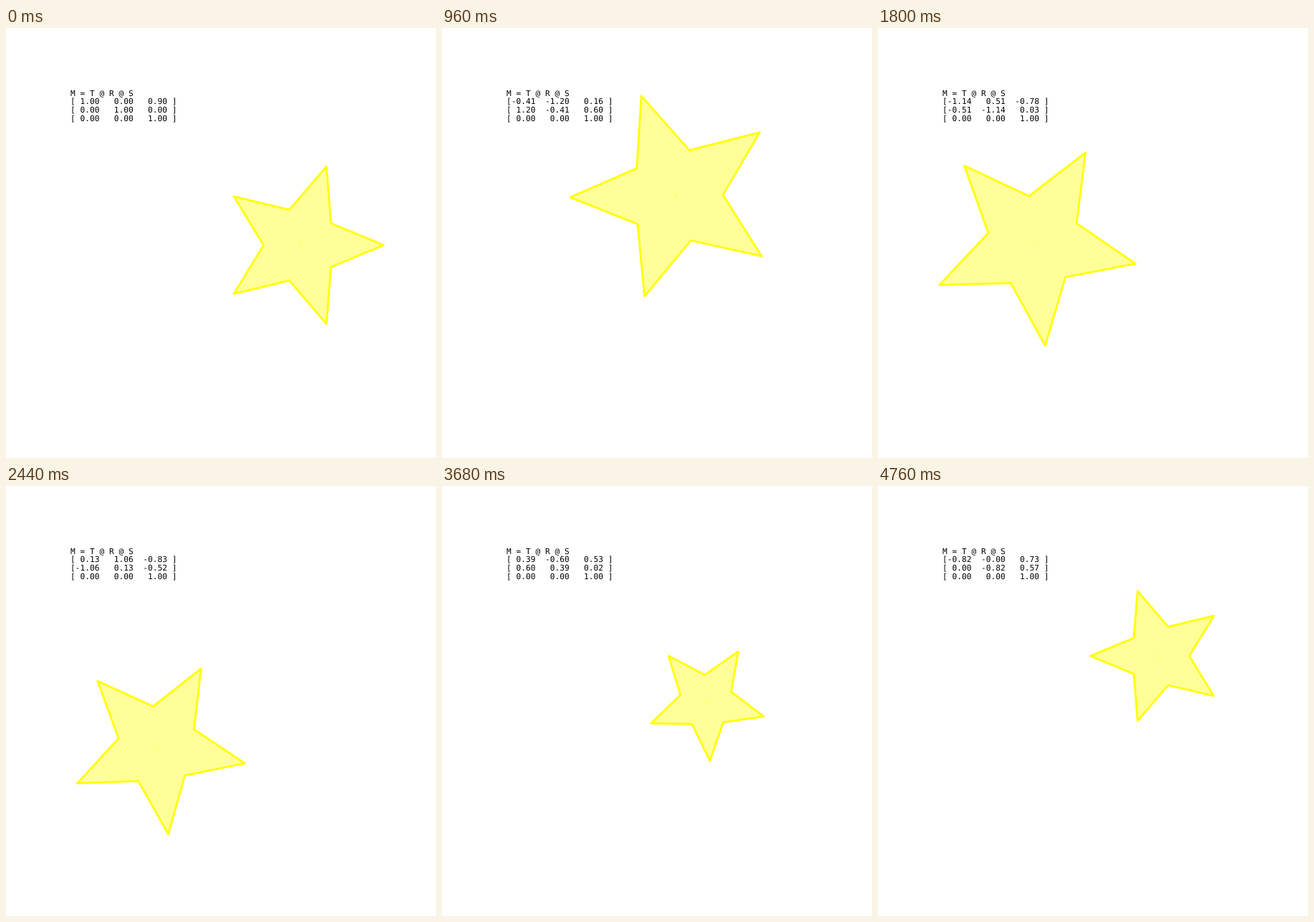
Animation of 600 by 600 pixels, one loop 4.8 s. Source, as an HTML page:

```html
<!DOCTYPE html>
<html>
<head>
<meta charset="utf-8">
<style>
  html, body { margin: 0; width: 100%; height: 100%; overflow: hidden; background: #fff; }
  svg { display: block; }
  text {
    font: 11.11px "DejaVu Sans Mono", monospace;
    letter-spacing: 0.06px;
    white-space: pre;
    text-rendering: geometricPrecision;
  }
</style>
</head>
<body>
<svg width="600" height="600" viewBox="0 0 600 600">
  <polygon id="star" fill="#ff9" stroke="#ff0" stroke-width="2.78" stroke-linejoin="round"/>
  <circle id="center" r="1.2" fill="#ff0" opacity="0.8"/>
  <text x="90" y="95">M = T @ R @ S</text>
  <text class="row" x="90" y="106"></text>
  <text class="row" x="90" y="118"></text>
  <text class="row" x="90" y="130"></text>
</svg>
<script>
const STEP = 40, STEPS = 120;
const UNIT = 115.5, ORIGIN = { x: 307.5, y: 303 };
const star = document.getElementById('star');
const center = document.getElementById('center');
const rows = document.querySelectorAll('.row');

// Unit star: ten vertices alternating between outer and inner radius
const vertices = Array.from({ length: 10 }, (_, i) => {
  const radius = i % 2 ? 0.45 : 1, angle = i * Math.PI / 5;
  return [radius * Math.cos(angle), radius * Math.sin(angle)];
});

function matrixAt(u) {
  const phase = 2 * Math.PI * u;
  const scale = 1 + 0.3 * Math.sin(0.9 * phase);
  const c = scale * Math.cos(1.5 * phase);
  const s = scale * Math.sin(1.5 * phase);
  return [
    [c, -s, 0.9 * Math.cos(1.1 * phase)],
    [s, c, 0.6 * Math.sin(1.3 * phase)],
    [0, 0, 1]
  ];
}

const toScreen = (x, y) => [ORIGIN.x + UNIT * x, ORIGIN.y - UNIT * y];
const formatRow = row => '[' + row.map(v => v.toFixed(2).padStart(5)).join('  ') + ' ]';

function draw(now) {
  const step = Math.floor(now / STEP) % STEPS;
  const m = matrixAt(step / (STEPS - 1));
  const place = ([x, y]) => toScreen(
    m[0][0] * x + m[0][1] * y + m[0][2],
    m[1][0] * x + m[1][1] * y + m[1][2]
  );
  star.setAttribute('points', vertices.map(place).join(' '));
  const [cx, cy] = place([0, 0]);
  center.setAttribute('cx', cx);
  center.setAttribute('cy', cy);
  rows.forEach((row, i) => row.textContent = formatRow(m[i]));
  requestAnimationFrame(draw);
}
draw(0);
</script>
</body>
</html>
```
